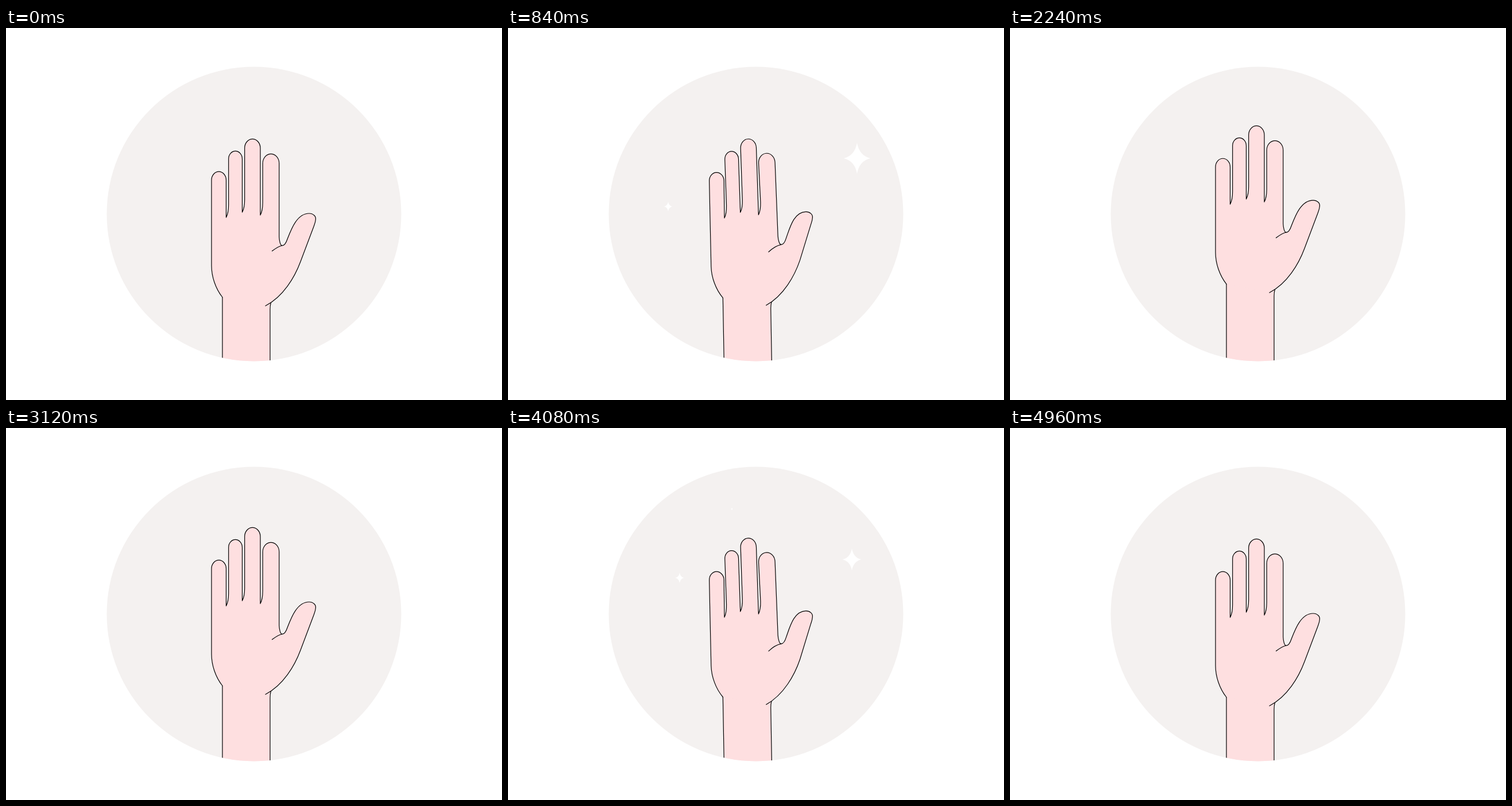
An HTML page with a canvas for the animation above (5000 ms loop, 864 by 648 pixels).

```html
<!DOCTYPE html>
<html lang="en">
<head>
<meta charset="utf-8">
<title>Waving hand</title>
<style>
  html, body { margin: 0; width: 100%; height: 100%; overflow: hidden; background: #fff; }
  canvas { display: block; }
</style>
</head>
<body>
<canvas id="stage" width="864" height="648"></canvas>
<script>
const ctx = document.getElementById('stage').getContext('2d');
const LOOP = 5000, STEP = 40, WAVE_GAP = 3240;
const SKIN = '#fedfe0', DISC = '#f4f1f0', INK = '#000';
const ELBOW = { x: 418, y: 620 }, WRIST = { x: 418, y: 475 };
const SLIT = 4.2;

// Turning points of the wave: time in ms, degrees
const SWING = [[360, 0], [690, 20.5], [940, -13.6], [1218, 16.7], [1530, -4.6], [1720, 0]];

// Little finger to index: width, top, bottom of the slit to its right, lean when closed
const FINGERS = [
  { width: 25.5, top: 250.2, slit: 330, lean: 1 },
  { width: 23.8, top: 214.3, slit: 321, lean: -0.6 },
  { width: 27.3, top: 193.4, slit: 326, lean: -0.6 },
  { width: 28.6, top: 219.3, lean: -1.5 }
];

// Smooth 0 to 1 between two times
function ease(t, from, to, bias = 1) {
  const u = Math.min(1, Math.max(0, (t - from) / (to - from))) ** bias;
  return u * u * (3 - 2 * u);
}

function swing(t) {
  let deg = 0;
  for (let i = 1; i < SWING.length; i++) {
    const [t0, a] = SWING[i - 1], [t1, b] = SWING[i];
    deg += (b - a) * ease(t, t0, t1, i === 1 ? 0.75 : 1);
  }
  return deg;
}

const grip = t => ease(t, 360, 690) - ease(t, 1530, 1720);
const lift = t => -24 * ease(t, 1960, 2280) + 4 * ease(t, 2280, 2540) + 20 * ease(t, 3360, 4220);

function turn(x, y, o, angle, to) {
  const c = Math.cos(angle), s = Math.sin(angle);
  x -= o.x;
  y -= o.y;
  return { x: to.x + x * c - y * s, y: to.y + x * s + y * c };
}

// Four-pointed star that swells and fades in size
function spark(x, y, size, t, from, span) {
  if (t <= from || t >= from + span) return;
  const w = size * Math.sin(Math.PI * (t - from) / span), h = w * 1.17, q = 0.17;
  ctx.beginPath();
  ctx.moveTo(x, y - h);
  for (const [sx, sy, px, py] of [[1, -1, 1, 0], [1, 1, 0, 1], [-1, 1, -1, 0], [-1, -1, 0, -1]]) {
    ctx.quadraticCurveTo(x + sx * w * q, y + sy * h * q, x + px * w, y + py * h);
  }
  ctx.fillStyle = '#fff';
  ctx.fill();
}

function sparks(t) {
  spark(608, 227, 25.5, t, 440, 1120);
  spark(279, 311, 7, t, 600, 480);
  spark(397, 142, 7, t, 1080, 480);
  spark(599, 229, 23, t, 3840, 960);
  spark(299, 261, 7.5, t, 3840, 480);
  spark(390, 141, 7, t, 4040, 480);
}

function forearm(fore, palm) {
  const left = palm(377, 469), leftEnd = fore(377, 680);
  const rightEnd = fore(460, 680), right = fore(460, 490);
  const bend = fore(460, 483), join = palm(461.5, 478), inner = palm(420, 440);
  const rightSide = () => {
    ctx.lineTo(right.x, right.y);
    ctx.quadraticCurveTo(bend.x, bend.y, join.x, join.y);
  };
  ctx.beginPath();
  ctx.moveTo(left.x, left.y);
  ctx.lineTo(leftEnd.x, leftEnd.y);
  ctx.lineTo(rightEnd.x, rightEnd.y);
  rightSide();
  ctx.lineTo(inner.x, inner.y);
  ctx.fill();
  ctx.beginPath();
  ctx.moveTo(left.x, left.y);
  ctx.lineTo(leftEnd.x, leftEnd.y);
  ctx.moveTo(rightEnd.x, rightEnd.y);
  rightSide();
  ctx.stroke();
}

function fingers(close) {
  let x = 358;
  for (const { width, top, slit, lean } of FINGERS) {
    const rx = width / 2, ry = rx * 1.15;
    ctx.ellipse(x + rx + lean * close, top + ry, rx, ry, 0, Math.PI, 2 * Math.PI);
    x += width;
    if (!slit) break;
    ctx.lineTo(x, slit);
    ctx.bezierCurveTo(x + 3.2, slit - 6, x + SLIT, slit - 14, x + SLIT, slit - 22);
    x += SLIT;
  }
}

function hand(close, fold) {
  const tip = 528 - 2.5 * close;
  ctx.beginPath();
  ctx.moveTo(377, 469);
  ctx.bezierCurveTo(365, 454, 358, 433, 358, 414);
  ctx.lineTo(358 + 2 * fold, 317);
  fingers(close);
  ctx.lineTo(475.8, 364);
  ctx.bezierCurveTo(476, 371, 478, 379, 481, 379);
  ctx.bezierCurveTo(485, 379, 488, 374, 490, 368);
  ctx.bezierCurveTo(497, 350, tip - 21, 323, tip, 323);
  ctx.bezierCurveTo(tip + 7, 323, tip + 12.5, 328, tip + 11.3, 334);
  ctx.bezierCurveTo(tip + 11, 339, tip + 9, 343, tip + 8, 346);
  ctx.lineTo(513, 407);
  ctx.bezierCurveTo(503, 434, 483, 468, 452, 484);
  ctx.fill();
  ctx.stroke();
  // Crease at the root of the thumb
  ctx.beginPath();
  ctx.moveTo(481, 379);
  ctx.bezierCurveTo(474 - 5 * fold, 380.5, 469 - 11 * fold, 384.5 + fold,
                    463.5 - 16 * fold, 388.5 + 9 * fold);
  ctx.stroke();
}

function draw(t) {
  const wt = t < 2600 ? t : t - WAVE_GAP;
  const deg = swing(wt), close = grip(wt);
  const fold = close * Math.min(1.3, Math.max(0, 0.38 + 0.056 * deg));
  const angle = deg * Math.PI / 180;
  const armAngle = (deg * 0.46 - close * 0.25) * Math.PI / 180;
  const base = { x: ELBOW.x, y: ELBOW.y + lift(t) };
  const fore = (x, y) => turn(x, y, ELBOW, armAngle, base);
  const wrist = fore(WRIST.x, WRIST.y);
  const palm = (x, y) => turn(x, y, WRIST, angle, wrist);

  ctx.fillStyle = '#fff';
  ctx.fillRect(0, 0, 864, 648);
  ctx.save();
  ctx.beginPath();
  ctx.arc(432, 324, 256.5, 0, 2 * Math.PI);
  ctx.fillStyle = DISC;
  ctx.fill();
  ctx.clip();
  sparks(t);

  ctx.fillStyle = SKIN;
  ctx.strokeStyle = INK;
  ctx.lineWidth = 1.2;
  ctx.lineCap = ctx.lineJoin = 'round';
  forearm(fore, palm);
  ctx.translate(wrist.x, wrist.y);
  ctx.rotate(angle);
  ctx.translate(-WRIST.x, -WRIST.y);
  hand(close, fold);
  ctx.restore();
}

const begin = performance.now();
function tick() {
  const t = (performance.now() - begin) % LOOP;
  draw(Math.floor(t / STEP) * STEP);
  requestAnimationFrame(tick);
}
tick();
</script>
</body>
</html>
```
